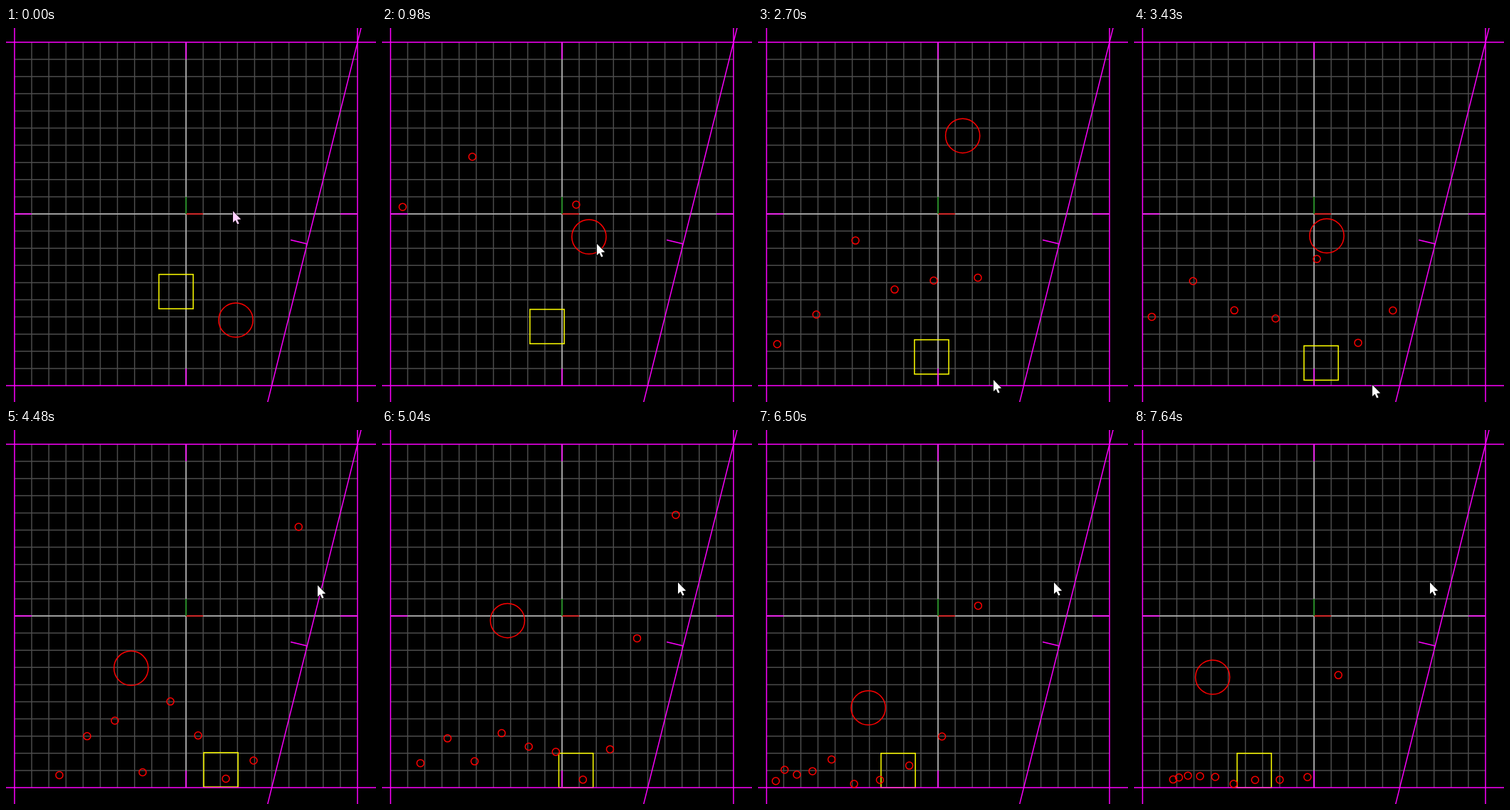
Write an HTML page with a canvas that moves like this. It is 520 px wide and 525 px high and loops after 7720 ms.

```html
<!DOCTYPE html>
<html lang="en">
<head>
<meta charset="utf-8">
<title>Rigid body bounce</title>
<style>
  html, body { margin: 0; width: 100%; height: 100%; overflow: hidden; background: #000; }
  canvas { display: block; }
</style>
</head>
<body>
<canvas id="stage" width="520" height="525"></canvas>
<script>
const ctx = document.getElementById('stage').getContext('2d');

// Time runs in whole simulation steps; lengths are in pixels.
const LOOP = 7720, STEP = 81.28, LAST = 94;
const G = 7.73;
const UNIT = 24.1, CX = 253, CY = 261;
const HALF = 10 * UNIT;
const LEFT = CX - HALF, RIGHT = CX + HALF, TOP = CY - HALF, FLOOR = CY + HALF;
const BIG = UNIT, SMALL = 5;
const MAGENTA = '#f0f';

// Key points: step, x, y. The disc flies freely between its hits.
const DISC = [
  [0, 323, 410], [4.7, 312, 478], [18.55, 272, 478], [38.85, 294, 478],
  [57.3, 159, 478], [70, 206, 302], [80, 155, 390], [94, 110.5, 347]
];
const MOUSE = [
  [0, 319, 257], [24, 284, 349], [31, 330, 492], [42, 335, 501],
  [50, 444, 240], [55, 438, 218], [62, 416, 214]
];
const BOX_X = [[0, 239], [24, 225], [42, 263], [55, 302], [80, 197], [94, 169]];

// The row of balls sloshes sideways: step, first x, gap, growth of the gap.
const CROWD = [
  [24, 29, 52, 0], [42, 25, 58, 0], [55, 75, 39, 0],
  [70, 30, 37, 0], [80, 25, 10, 2.4], [94, 55, 6, 2.2]
];
const BALLS = 10;

// Linear value between key points, and the lift of a ballistic arc there.
function along(keys, t) {
  const end = keys.findIndex(k => k[0] > t);
  if (end <= 0) return { v: keys[end < 0 ? keys.length - 1 : 0].slice(1), lift: 0 };
  const a = keys[end - 1], b = keys[end];
  const span = b[0] - a[0], u = (t - a[0]) / span;
  return {
    v: a.slice(1).map((p, i) => p + (b[i + 1] - p) * u),
    lift: G / 2 * span * span * u * (1 - u)
  };
}

// Height above the floor after a throw, with hops that shrink down to a least one.
function hopHeight(t, height, up, keep, least) {
  const speed = Math.sqrt(up * up + 2 * G * height);
  const landing = (up + speed) / G;
  if (t < landing) return height + up * t - G / 2 * t * t;
  t -= landing;
  let hop = 2 * speed / G * keep;
  while (t > hop && hop > 0.5) {
    t -= hop;
    hop = Math.max(least, hop * keep);
  }
  return Math.max(0, G / 2 * t * (hop - t));
}

function discAt(t) {
  const { v: [x, y], lift } = along(DISC, t);
  return { x, y: y - lift };
}

function boxAt(t) {
  const rest = FLOOR - BIG;
  return { x: along(BOX_X, t).v[0], y: rest - hopHeight(t, rest - 370, 0, 0.85, 0) };
}

const slopeX = y => RIGHT - 5 * UNIT * (y - TOP) / (2 * HALF);

// Balls are tossed up from the pointer, then join the row.
function ballAt(i, t) {
  const born = 2 + 3.6 * i ** 1.25;
  if (t < born) return null;
  const age = t - born, rest = FLOOR - SMALL;
  const [mx, my] = along(MOUSE, born).v;
  const [first, gap, growth] = along(CROWD, t).v;
  const goal = first + gap * i + growth * i * i;
  const y = rest - hopHeight(age, Math.max(0, rest - my), 40, 0.82, 3.5);
  const x = mx + (goal - mx) * Math.min(1, age / 8);
  return { x: Math.min(x, slopeX(y) - SMALL), y };
}

function line(x1, y1, x2, y2, color) {
  ctx.strokeStyle = color;
  ctx.beginPath();
  ctx.moveTo(x1, y1);
  ctx.lineTo(x2, y2);
  ctx.stroke();
}

function ring(p, r) {
  ctx.strokeStyle = '#f00';
  ctx.beginPath();
  ctx.arc(p.x, p.y, r, 0, 2 * Math.PI);
  ctx.stroke();
}

function drawGrid() {
  for (let i = -9; i <= 9; i++) {
    const d = i * UNIT;
    line(LEFT, CY + d, RIGHT, CY + d, '#4c4c4c');
    line(CX + d, TOP, CX + d, FLOOR, '#4c4c4c');
  }
  line(LEFT, CY, RIGHT, CY, '#c0c0c0');
  line(CX, TOP, CX, FLOOR, '#c0c0c0');
  line(CX, CY, CX + UNIT, CY, '#e00000');
  line(CX, CY, CX, CY - UNIT, '#008000');
}

function drawWalls() {
  for (const s of [-1, 1]) {
    const x = CX + s * HALF, y = CY + s * HALF;
    line(0, y, 520, y, MAGENTA);
    line(x, 0, x, 525, MAGENTA);
    line(x, CY, x - s * UNIT, CY, MAGENTA);
    line(CX, y, CX, y - s * UNIT, MAGENTA);
  }
  line(slopeX(-2), -2, slopeX(527), 527, MAGENTA);
  line(423, 303, 400, 297.5, MAGENTA);
}

function drawMouse(t) {
  const [x, y] = along(MOUSE, t).v.map(Math.round);
  ctx.beginPath();
  [[0, 0], [0, 16], [3.5, 12.8], [6.2, 18.6], [8.6, 17.5], [6.1, 12], [11.2, 11.6]]
    .forEach(([dx, dy]) => ctx.lineTo(x + dx, y + dy));
  ctx.closePath();
  ctx.strokeStyle = '#000';
  ctx.stroke();
  ctx.fillStyle = t ? '#fff' : '#ffd0ff';
  ctx.fill();
}

function draw(t) {
  ctx.fillStyle = '#000';
  ctx.fillRect(0, 0, 520, 525);
  ctx.lineWidth = 1.5;
  drawGrid();

  const box = boxAt(t);
  ctx.strokeStyle = '#ff0';
  ctx.strokeRect(box.x - BIG, box.y - BIG, 2 * BIG, 2 * BIG);
  drawWalls();

  ring(discAt(t), BIG);
  for (let i = 0; i < BALLS; i++) {
    const ball = ballAt(i, t);
    if (ball) ring(ball, SMALL);
  }
  drawMouse(t);
}

const start = performance.now();
function tick() {
  const ms = (performance.now() - start) % LOOP;
  draw(Math.min(LAST, Math.floor((ms + 10) / STEP)));
  requestAnimationFrame(tick);
}
tick();
</script>
</body>
</html>
```
